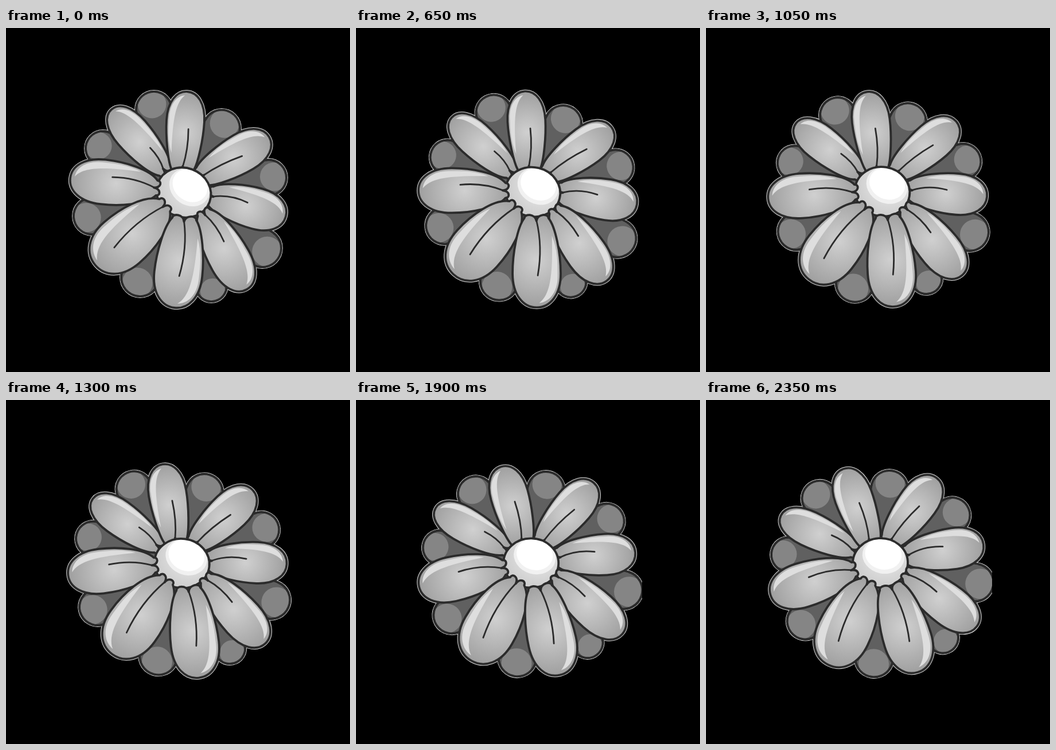
An HTML page with a canvas that plays this animation: 600x600 px, repeating every 2400 ms.

```html
<!DOCTYPE html>
<html lang="en">
<head>
<meta charset="utf-8">
<title>Turning flower</title>
<style>
  html, body { margin: 0; width: 100%; height: 100%; overflow: hidden; background: #000; }
  canvas { display: block; width: 600px; height: 600px; }
</style>
</head>
<body>
<canvas id="stage" width="600" height="600"></canvas>
<script>
const ctx = document.getElementById('stage').getContext('2d');
const LOOP = 2400, STEP = 50, DEGREES_PER_STEP = 0.5;
const INK = '#2b2b2b', SHADE = '#606060';
const HUB = { x: 310, y: 287 };

function ellipse(x, y, rx, ry = rx, degrees = 0) {
  const path = new Path2D();
  path.ellipse(x, y, rx, ry, degrees * Math.PI / 180, 0, Math.PI * 2);
  return path;
}

function glow(x, y, radius, inner, outer) {
  const gradient = ctx.createRadialGradient(x, y, 0, x, y, radius);
  gradient.addColorStop(0, inner);
  gradient.addColorStop(1, outer);
  return gradient;
}

// Petals are built along the x axis: l is the length, w half the width, n half the neck.
function petalEdge(l, w, n) {
  const path = new Path2D();
  path.moveTo(0, -n);
  path.bezierCurveTo(0.1 * l, -0.8 * w, 0.4 * l, -w, 0.62 * l, -w);
  path.bezierCurveTo(0.86 * l, -w, l, -0.56 * w, l, 0);
  path.bezierCurveTo(l, 0.56 * w, 0.86 * l, w, 0.62 * l, w);
  path.bezierCurveTo(0.4 * l, w, 0.1 * l, 0.8 * w, 0, n);
  // Two small lobes meet where the vein begins.
  path.bezierCurveTo(-8, n, -8, 0.1 * n, 5, 0);
  path.bezierCurveTo(-8, -0.1 * n, -8, -n, 0, -n);
  path.closePath();
  return path;
}

function petalShine(l, w) {
  const path = new Path2D();
  path.moveTo(0.2 * l, 0.64 * w);
  path.bezierCurveTo(0.36 * l, 0.88 * w, 0.5 * l, 0.87 * w, 0.65 * l, 0.87 * w);
  path.bezierCurveTo(0.84 * l, 0.87 * w, 0.94 * l, 0.5 * w, 0.95 * l, 0.1 * w);
  path.bezierCurveTo(0.86 * l, 0.55 * w, 0.66 * l, 0.68 * w, 0.2 * l, 0.64 * w);
  return path;
}

function petalVein(reach, drift, bow) {
  const path = new Path2D();
  path.moveTo(4, 0);
  path.quadraticCurveTo(reach / 2, drift / 2 + bow, reach, drift);
  return path;
}

function frontPetal({ base, tip, width, neck, vein, side }) {
  const dx = tip[0] - base[0], dy = tip[1] - base[1];
  const length = Math.hypot(dx, dy);
  const matrix = new DOMMatrix().translate(...base).rotate(Math.atan2(dy, dx) * 180 / Math.PI);
  const place = (path, flip = 1) => {
    const placed = new Path2D();
    placed.addPath(path, matrix.scale(1, flip));
    return placed;
  };
  return {
    shape: place(petalEdge(length, width, neck)),
    shine: place(petalShine(length, width), side),
    line: place(petalVein(...vein)),
    fill: glow(base[0] + dx * 0.47, base[1] + dy * 0.47, length * 0.6, '#d0d0d0', '#989898')
  };
}

function backPetal([x, y, r]) {
  const away = Math.atan2(y - HUB.y, x - HUB.x);
  const shift = 0.32 * r;
  return {
    x, y, r,
    shape: ellipse(x, y, r),
    light: ellipse(x + shift * Math.cos(away), y + shift * Math.sin(away), 0.8 * r)
  };
}

const backPetals = [
  [258, 142, 31], [376, 175, 32], [458, 261, 31], [447, 384, 33],
  [358, 450, 27], [234, 435, 33], [150, 328, 32], [169, 210, 30]
].map(backPetal);

// vein: reach along the petal, sideways drift of its end, bow of its middle.
const upperPetals = [
  { base: [277, 249], tip: [184, 142], width: 31, neck: 13, vein: [47, 7, 5], side: 1 },
  { base: [308, 246], tip: [316, 111], width: 33, neck: 20, vein: [70, 6, 5], side: -1 },
  { base: [341, 259], tip: [459, 190], width: 34, neck: 18, vein: [79, 5, -5], side: -1 },
  { base: [357, 293], tip: [488, 329], width: 36, neck: 17, vein: [65, -6, -9], side: -1 }
].map(frontPetal);

const lowerPetals = [
  { base: [263, 279], tip: [112, 262], width: 39, neck: 13, vein: [79, 10, 9], side: 1 },
  { base: [345, 322], tip: [420, 456], width: 36, neck: 12, vein: [61, -6, -6], side: -1 },
  { base: [277, 309], tip: [156, 414], width: 47, neck: 14, vein: [115, 2, 12], side: 1 },
  { base: [311, 333], tip: [294, 488], width: 42, neck: 21, vein: [100, -2, -10], side: -1 }
].map(frontPetal);

const hub = ellipse(HUB.x, HUB.y, 48, 43, 20);
const hubFill = glow(325, 276, 72, '#ececec', '#c6c6c6');
const hubHalo = ellipse(320, 278, 37, 31, 35);
const hubShine = ellipse(321, 275, 32, 27, 35);

function paint(path, fill) {
  ctx.fillStyle = fill;
  ctx.fill(path);
}

function outline(path, width = 3.8, color = INK) {
  ctx.lineWidth = width;
  ctx.strokeStyle = color;
  ctx.stroke(path);
}

function drawBack({ x, y, r, shape, light }) {
  paint(shape, SHADE);
  outline(shape);
  const stem = new Path2D();
  stem.moveTo(HUB.x, HUB.y);
  stem.lineTo(x, y);
  ctx.lineCap = 'butt';
  outline(stem, 2 * r - 4, SHADE);
  ctx.lineCap = 'round';
  ctx.save();
  ctx.clip(shape);
  paint(light, '#858585');
  ctx.restore();
  const rim = new Path2D();
  const away = Math.atan2(y - HUB.y, x - HUB.x);
  rim.arc(x, y, r, away - Math.PI / 2, away + Math.PI / 2);
  outline(rim);
}

function drawFront({ shape, shine, line, fill }) {
  paint(shape, fill);
  paint(shine, '#dedede');
  outline(shape);
  outline(line, 2.8);
}

function drawHub() {
  paint(hub, hubFill);
  paint(hubHalo, '#f1f1f1');
  paint(hubShine, '#fff');
  outline(hub);
}

function drawFlower() {
  for (const { shape } of [...backPetals, ...upperPetals, ...lowerPetals]) {
    outline(shape, 5.8, '#d8d8d8');
  }
  backPetals.forEach(drawBack);
  upperPetals.forEach(drawFront);
  drawHub();
  lowerPetals.forEach(drawFront);
}

function render(now) {
  const step = Math.floor((now % LOOP) / STEP);
  ctx.fillStyle = '#000';
  ctx.fillRect(0, 0, 600, 600);
  ctx.save();
  ctx.beginPath();
  ctx.rect(100, 100, 399, 400);
  ctx.clip();
  ctx.translate(300, 300);
  ctx.rotate(-step * DEGREES_PER_STEP * Math.PI / 180);
  ctx.translate(-300, -300);
  drawFlower();
  ctx.restore();
}

ctx.lineCap = ctx.lineJoin = 'round';
let start;
function tick(now) {
  start ??= now;
  render(now - start);
  requestAnimationFrame(tick);
}
render(0);
requestAnimationFrame(tick);
</script>
</body>
</html>
```
